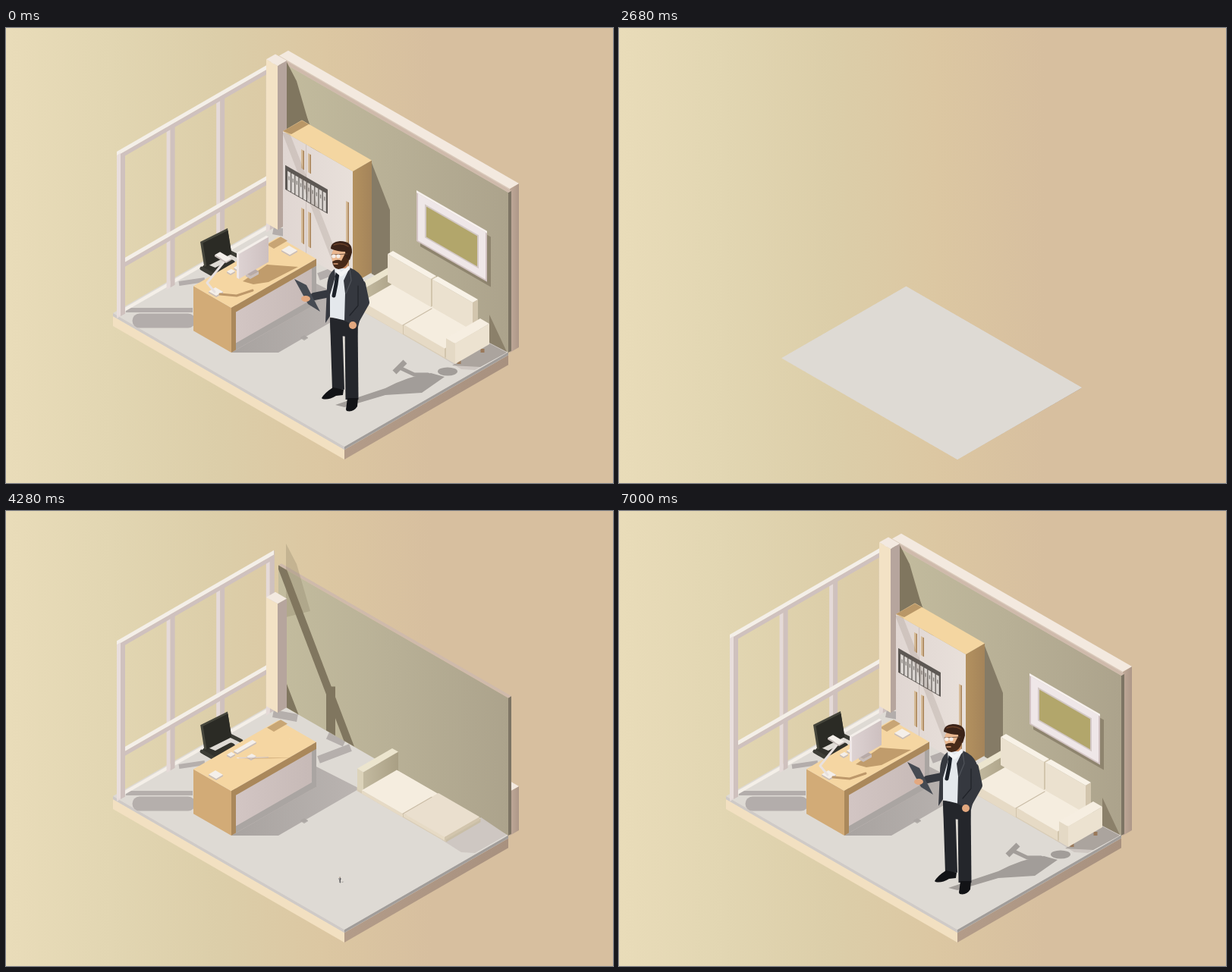
Write an HTML page with a canvas that moves like this. It is 800 px wide and 600 px high and loops after 7040 ms.

```html
<!DOCTYPE html>
<html lang="en">
<head>
<meta charset="utf-8">
<title>Isometric office</title>
<style>
html, body { margin: 0; width: 100%; height: 100%; overflow: hidden; background: #d7bf9f; }
canvas { display: block; width: 800px; height: 600px; }
</style>
</head>
<body>
<canvas id="stage" width="800" height="600"></canvas>
<script>
const c = document.getElementById('stage').getContext('2d');
const LOOP = 7040, STEP = 40, MIDDLE = 2980, RISE = 950, ISO = 0.577;

// When each wave of parts starts to rise, in ms after the empty stage.
const START = {};
const wave = (at, names) => names.split(' ').forEach(n => START[n] = at);
wave(105, 'floor');
wave(600, 'slab desk chair sofa pad');
wave(850, 'window');
wave(1030, 'wall');
wave(1150, 'pillar');
wave(1257, 'outer seats');
wave(1295, 'man monitor');
wave(1310, 'cabinet picture cushions arm lamp');

function grow(part, b) {
  const x = (b - START[part]) / RISE;
  return x <= 0 ? 0 : x >= 1 ? 1 : 1 - 2 ** (-10 * x);
}

function poly(fill, ...p) {
  c.beginPath();
  for (let i = 0; i < p.length; i += 2) c.lineTo(p[i], p[i + 1]);
  c.fillStyle = fill;
  c.fill();
}
function rect(fill, ...r) { c.fillStyle = fill; c.fillRect(...r); }
function shape(fill, d) { c.fillStyle = fill; c.fill(new Path2D(d)); }
function oval(fill, x, y, rx, ry, turn = 0) {
  c.beginPath();
  c.ellipse(x, y, rx, ry, turn, 0, 7);
  c.fillStyle = fill;
  c.fill();
}
function line(color, width, d, cap = 'round') {
  c.strokeStyle = color; c.lineWidth = width; c.lineCap = cap; c.lineJoin = 'round';
  c.stroke(new Path2D(d));
}
function group(draw) { c.save(); draw(); c.restore(); }
function fade(k, draw) { group(() => { c.globalAlpha = k; draw(); }); }
function scaled(x, y, k, draw, kx = k) {
  if (k < .004) return;
  group(() => { c.translate(x, y); c.scale(kx, k); c.translate(-x, -y); draw(); });
}
// Upright planes: x runs along the wall, y is vertical and scaled by k.
function plane(slope, x, y, k, draw) {
  group(() => { c.transform(1, slope, 0, k, x, y); draw(); });
}
const onRight = (...args) => plane(ISO, ...args);
const onLeft = (...args) => plane(-ISO, ...args);

function blend(x0, x1, ...colors) {
  const g = c.createLinearGradient(x0, 0, x1, 0);
  colors.forEach((col, i) => g.addColorStop(i / (colors.length - 1), col));
  return g;
}

// Box standing on its front corner (x, y), reaching l to the left and r to the right.
function box(x, y, l, r, h, top, left, right) {
  if (h <= 0) return;
  onRight(x - l, y - l * ISO, 1, () => rect(left, 0, -h, l, h));
  onLeft(x, y, 1, () => rect(right, 0, -h, r, h));
  const yl = y - h - l * ISO, yr = y - h - r * ISO;
  poly(top, x, y - h, x - l, yl, x - l + r, yl - r * ISO, x + r, yr);
}

function backdrop() {
  rect(blend(0, 560, '#e9dcb9', '#e2d6b2', '#dccea9', '#dcc7a2', '#d7bf9f'), 0, 0, 800, 600);
}

function floor(k, slab) {
  if (!k) return;
  const l = 305 * k, r = 216 * k, h = 13 * slab, top = '#dedad4';
  box(446, 569, l, r, Math.max(h, .1), top, '#f2e0c1', blend(0, r, '#b39c89', '#a8917f'));
  box(446, 569 - h, l, r, Math.max(4 * slab, .1), top, '#cfcac7', '#a19d9a');
}

function floorShadows(desk, panes) {
  const shade = '#b3adab';
  fade(panes, () => {
    line(shade, 19, 'M176 386 L240 386');
    line(shade, 6, 'M158 372 L246 372 M228 337 L262 332', 'butt');
    line(shade, 10, 'M352 267 L384 273 M424 296 L446 306 M412 328 L454 312', 'butt');
  });
  fade(desk, () => {
    poly(blend(300, 465, '#a8a3a0', '#bab4b1'), 297, 428, 359, 428, 466, 366, 403, 334);
    box(393, 412, 5, 5, 1, '#aaa5a2', '#aaa5a2', '#aaa5a2');
  });
}

function windowFrame(k) {
  if (!k) return;
  const H = 217, W = 207, SPACING = 65.6, light = '#f4efe8', shade = '#cfc1be';
  onLeft(146, 381, 1, () => {
    rect(light, 5, -6, W - 5, 5);
    for (let i = 3; i >= 0; i--) {
      const x = i * SPACING;
      rect('#e5dad8', x, -H * k, 5, H * k + 2);
      rect(shade, x + 5, -H * k, 6, H * k + 2);
    }
    for (const y of [72, H + 1]) {
      const top = Math.min(H * (1 - k) - y, -8);
      rect(light, y < H ? 11 : 0, top, W, 6);
      rect(shade, y < H ? 11 : 5, top + 6, W - 5, 6);
    }
    rect('#e9dedc', 0, -H * k + 4, 5, H * k - 4);
  });
}

function rightWall(outer, k, cabinet) {
  box(664, 428, 304, 12, 216 * outer, '#f3e9df', '#d8c8bb', blend(0, 12, '#c0a999', '#ad9788'));
  if (!k) return;
  const W = 303, H = 211 * k, dark = '#80765f';
  box(662, 428, W, 4, H, '#cfbaab', blend(0, W, '#c3bc9e', '#b8b096', '#aca38c'), '#7d7464');
  group(() => {
    c.beginPath();
    c.transform(1, ISO, 0, 1, 359, 253);
    c.rect(0, -H, W, H);
    c.transform(1, -ISO, 0, 1, 0, 0);
    c.clip();
    // the sun's bars ride on the top edge of the wall
    c.translate(-359, -H - 72 + 72 * 0 + 0);
    line(dark, 10, 'M357 58 L457 320', 'butt');
    line(dark, 12, 'M428 232 L428 297', 'butt');
    poly(dark, 369, 226, 386, 270, 369, 260);
  });
  fade(outer, () => poly(dark, 369, 43, 383, 70, 401, 132, 369, 140));
  scaled(482, 324, cabinet, () => poly('#857b66', 482, 178, 506, 240, 506, 338, 482, 324), 1);
}

function cabinet(k) {
  if (!k) return;
  const W = 92, H = 148, h = H * k;
  box(457, 337, W, 25, h, '#f4d6a1', blend(0, W, '#e0d6d2', '#e8e0da'), blend(0, 25, '#b3915f', '#a4845a'));
  poly('#b99767', 365, 284 - h, 390, 270 - h, 399, 275 - h, 376, 288 - h);
  const handle = (x, y, n) => {
    rect('#d5bb98', x, y, 4, n);
    rect('#a9845a', x + 2.5, y, 1.5, n);
  };
  onRight(365, 284, k, () => {
    rect('#cfc4c0', 30, -H, 1, H);
    rect('#5d5854', 3, -105, 56, 32);
    for (let x = 6; x < 56; x += 5.2) {
      rect('#d9d4d0', x, -99, 4, 25);
      rect('#85807c', x + 1.3, -93, 1.4, 5);
    }
    for (const x of [24, 33]) {
      handle(x, -138, 25);
      handle(x, -61, 46);
    }
    handle(83, -104, 84);
    line('rgba(110,95,85,.16)', 11, 'M4 -148 L70 -16', 'butt');
  });
}

function picture(k) {
  const W = 93, H = 66;
  const layers = { 0: '#d2c3c2', 2: '#efe7e8', 11: '#d3c8c5', 13: '#b2a66b' };
  scaled(588, 274, k, () => onRight(541, 215, 1, () => {
    rect('#8e846e', 5, 4, W, H);
    for (const inset in layers) rect(layers[inset], +inset, +inset, W - 2 * inset, H - 2 * inset);
    rect('#f7f1ee', 0, -1, W, 3);
  }));
}

function chair(k) {
  scaled(284, 328, k, () => {
    line('#32322c', 11, 'M264 317 L276 322 L297 311');
    line('#3d3d36', 5, 'M296 296 L310 303 M258 317 L272 325');
    group(() => {
      c.transform(1, -.5, .16, 1, 256, 282);
      rect('#46463c', 0, 0, 36, 33);
      rect('#2b2b25', 3, 3, 33, 31);
    });
  });
}

function desk(k) {
  if (!k) return;
  const L = 50, R = 112, H = 59 * k, edge = '#aa885b', shade = '#aaa5a2';
  box(297, 428, L, R, H, '#f5d6a2', '#d2ab77', blend(0, R, '#d3c6c4', '#c6b9b6'));
  onLeft(297, 428, 1, () => {
    rect(shade, 6, -9 * k, R - 6, 9 * k);
    rect(shade, R - 6, -H, 6, H);
    rect(edge, 0, -H, R, 9 * k);
    rect(edge, 0, -H, 6, H);
  });
}

function deskItems(pad, monitor, lamp) {
  const top = '#f4efea', side = '#c9bebb';
  const sheet = (x, y, l, r, k) => scaled(x, y, k, () => box(x, y, l, r, 2, top, side, side));
  fade(pad, () => box(353, 291, 9, 18, .1, '#c8a575', 'transparent', 'transparent'));
  sheet(296, 326, 5, 6, pad);
  sheet(305, 321, 5, 25, pad);
  sheet(323, 329, 6, 7, pad * (1 - monitor));
  sheet(374, 301, 11, 10, monitor);
  sheet(277, 355, 10, 9, pad);
  scaled(325, 326, monitor, () => {
    poly('#c09c6c', 312, 334, 344, 312, 385, 315, 346, 335, 326, 338);
    box(322, 331, 6, 11, 4, '#b7aaa8', side, side);
    box(307, 331, 3, 39, 33, top, '#efe7e6', blend(0, 39, '#ddd2d2', '#cdc0c0'));
  }, 1);
  scaled(276, 348, lamp, () => {
    line('#bd986a', 3, 'M282 351 L304 353 L325 346');
    line('#e8e1df', 3, 'M275 348 L265 336 L290 305');
    box(290, 310, 15, 7, 2, top, side, side);
  });
}

function sofa(b) {
  const k = grow('sofa', b), s = grow('seats', b), back = grow('cushions', b), arm = grow('arm', b);
  if (!k) return;
  const top = '#f5eddf', front = '#e6dac5', side = '#d2c5ad';
  fade(k, () => poly('#cec7c2', 575, 434, 626, 404, 660, 427, 618, 451, 600, 450));
  fade(arm, () => {
    poly('#aba49e', 588, 445, 637, 416, 660, 428, 625, 447);
    poly('#8b806a', 637, 378, 660, 427, 637, 415);
    line('#9a795a', 5, 'M597 438 L597 443 M628 423 L628 428', 'butt');
  });
  scaled(548, 388, k, () => box(580, 437, 118, 46, 5, '#e9decd', '#d8ccb6', '#c9bea6'));
  box(471, 371, 8, 46, 27 * k, '#ece5ce', '#dcd3ba', blend(0, 46, '#c3baa0', '#a99f84'));
  for (const i of [0, 1]) box(523 + 55 * i, 404 + 30.5 * i, 54, 46, 2 + 10 * s, i && s < .9 ? '#eadfce' : top, front, side);
  line('#cabda7', 1.2, `M523 ${402 - 10 * s} l38 -22`);
  for (const i of [0, 1]) box(560 + 55 * i, 368 + 31 * i, 57 - 4 * i, 7, 37 * back, '#f8f2e7', '#ebe1cf', side);
  box(592, 443, 12, 45, 27 * arm, '#f6eee1', '#e4d9c5', '#ece2d0');
}

function manShadow() {
  const gray = '#a29d99';
  shape(gray, 'M434 497 L500 475 Q530 459 560 455 L578 460 L548 481 L500 484 L446 500 Z');
  oval(gray, 582, 453, 13, 5.5);
  line(gray, 7, 'M512 454 L526 440', 'butt');
  line(gray, 5, 'M519 448 L538 457 L556 457');
}

function man(sway) {
  const cloth = '#35383f', trousers = '#24262b', shoe = '#121316', skin = '#e3a87f', hair = '#3b2318';
  line(trousers, 16, 'M435 384 L438 477', 'butt');
  line(trousers, 17, 'M455 384 L456 490', 'butt');
  poly(trousers, 427, 382, 464, 384, 463, 408, 428, 405);
  shape(shoe, 'M416 488 Q420 481 431 474 L445 477 L444 484 L435 485 Q425 491 417 489 Z');
  shape(shoe, 'M448 503 L450 488 L464 488 L463 499 Q458 507 449 505 Z');
  group(() => {
    c.translate(404, 354); c.rotate(-.09 * sway); c.translate(-404, -354);
    line(cloth, 10, 'M426 350 L406 354');
    poly('#454a52', 380, 331, 396, 339, 414, 374, 398, 364);
    oval(skin, 395, 357, 6, 4);
  });
  // shirt, tie, jacket
  shape('#e4e8ec', 'M434 317 L451 315 L454 335 L448 386 L427 381 L426 342 Z');
  line('#1b2028', 5, 'M437 323 L435 338 L432 353');
  shape(cloth, 'M433 318 Q423 325 423 344 L421 389 L427 380 L427 352 L434 328 Z');
  shape(cloth, 'M453 316 Q466 321 471 332 L476 362 L468 378 L464 394 L446 386 L447 350 L445 333 Z');
  line(cloth, 10, `M469 338 L${474 + sway} 362 L461 385`);
  line('#50545b', 1.2, 'M453 318 L455 333 L448 350');
  line('#202329', 1.2, 'M464 340 L464 366 L453 379');
  oval(skin, 457, 392, 5, 5);
  // head
  line('#cf9168', 11, 'M445 310 L445 317', 'butt');
  line('#f3f4f5', 5, 'M437 321 L442 325 L451 317');
  oval('#eab78f', 439, 301, 10, 13);
  shape('#472a19', 'M430 308 Q437 304 442 307 L447 297 L453 302 Q450 317 438 318 Q431 317 430 308 Z');
  line('#dfa17a', 1.5, 'M432 311 L437 311');
  shape(hair, 'M428 291 Q428 282 440 281 Q457 281 456 296 L453 306 L448 303 L447 295 Q437 295 428 291 Z');
  line('#6a4028', 1.5, 'M432 286 Q442 282 451 288');
  line('#5b4438', .8, 'M429 299 L450 298');
  for (const x of [432, 438]) oval('#f3eeea', x, 301, 2.6, 2.4);
}

function draw(t) {
  const b = Math.abs(t - MIDDLE), k = part => grow(part, b);
  const sway = (1 - Math.cos(t / LOOP * 4 * Math.PI)) / 2;
  backdrop();
  floor(k('floor'), k('slab'));
  floorShadows(k('desk'), k('window'));
  rightWall(k('outer'), k('wall'), k('cabinet'));
  windowFrame(k('window'));
  box(358, 266, 15, 12, 216 * k('pillar'), '#f3e9e0', '#f3e2c5', '#b6a59d');
  cabinet(k('cabinet'));
  picture(k('picture'));
  chair(k('chair'));
  desk(k('desk'));
  deskItems(k('pad'), k('monitor'), k('lamp'));
  sofa(b);
  scaled(440, 490, k('man'), () => { manShadow(); man(sway); });
}

const begin = performance.now();
function tick() {
  const t = (performance.now() - begin) % LOOP;
  draw(Math.floor(t / STEP) * STEP);
  requestAnimationFrame(tick);
}
tick();
</script>
</body>
</html>
```
